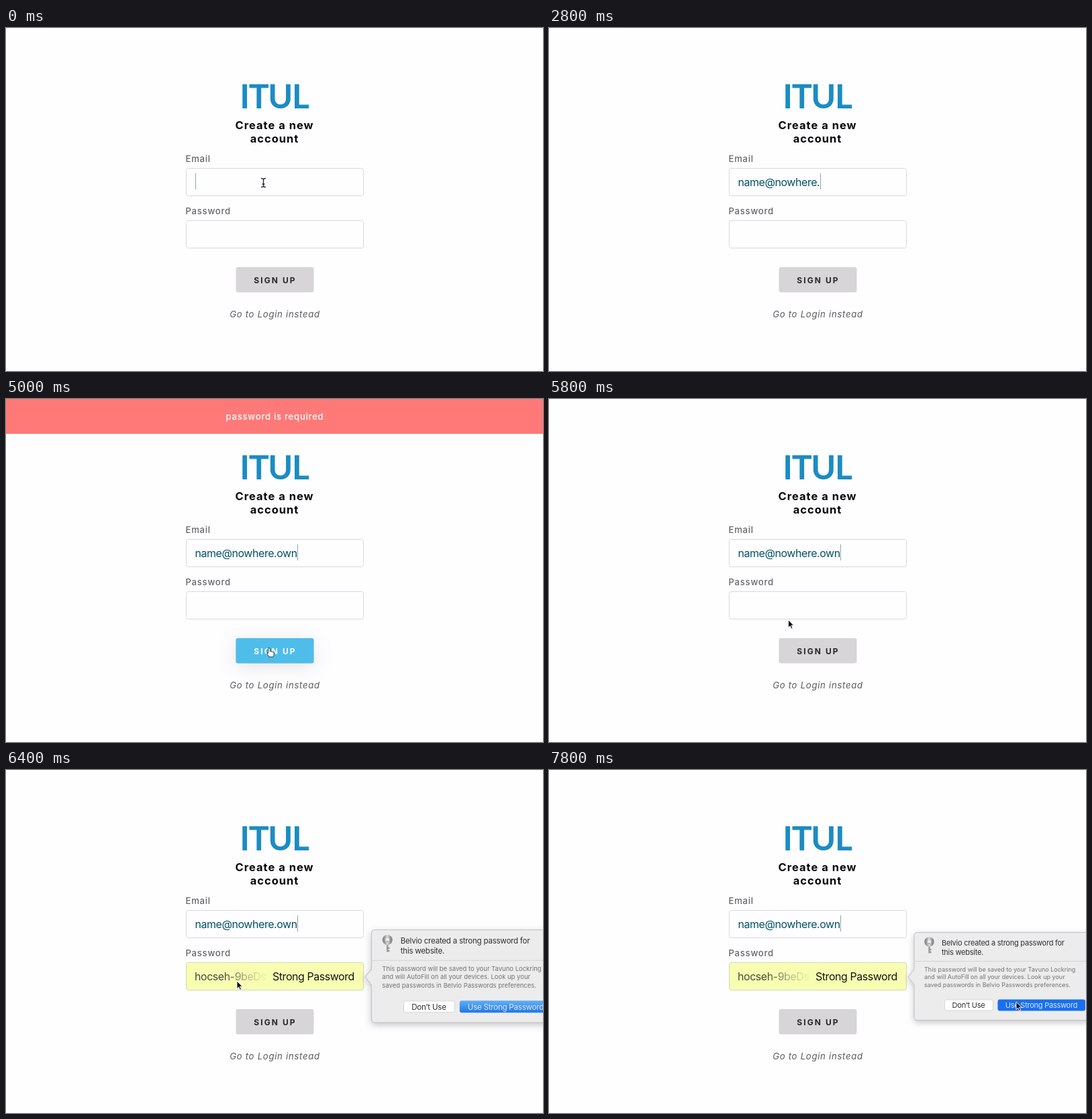
Animation, 800 px wide and 512 px high, one loop 8000 ms. Source, as an HTML page:

```html
<!DOCTYPE html>
<html lang="en">
<head>
<meta charset="utf-8">
<title>Create a new account</title>
<style>
html, body { margin: 0; width: 100%; height: 100%; overflow: hidden; background: #fefdff; }
svg { display: block; width: 100vw; height: 100vh; }
text { font-family: Inter, "Open Sans", sans-serif; }
.mid { text-anchor: middle; }
.brand { font: 700 50px Lato, sans-serif; letter-spacing: -1.4px; fill: #1b8cc3; }
.heading { font-size: 16.5px; font-weight: 700; letter-spacing: 1px; fill: #080808; }
.label { font-size: 13.2px; font-weight: 450; letter-spacing: .7px; fill: #666; }
.link { font-style: italic; fill: #5c5c5c; }
.field { fill: #fefdff; stroke: #dadada; }
.value { font-size: 16px; letter-spacing: -.45px; fill: #005064; }
.action { font-size: 12px; font-weight: 700; letter-spacing: 2.1px; fill: #262626; }
.note { font-size: 11px; letter-spacing: -.24px; fill: #303030; }
.small { font-size: 9px; fill: #737373; }
#hover { filter: drop-shadow(0 5px 14px rgba(0, 0, 0, .1)); }
#popover { filter: drop-shadow(0 3px 5px rgba(0, 0, 0, .22)); }
</style>
</head>
<body>
<svg viewBox="0 0 800 512">
  <defs>
    <linearGradient id="fade" gradientUnits="userSpaceOnUse" x1="325" x2="393" y1="0" y2="0">
      <stop stop-color="#454a3c"/>
      <stop offset="1" stop-color="#8d8a70" stop-opacity="0"/>
    </linearGradient>
    <linearGradient id="blue" x2="0" y2="1">
      <stop stop-color="#62aef6"/>
      <stop offset="1" stop-color="#2178e6"/>
    </linearGradient>
    <linearGradient id="metal">
      <stop stop-color="#8d8d8d"/>
      <stop offset=".5" stop-color="#d8d8d8"/>
      <stop offset="1" stop-color="#8a8a8a"/>
    </linearGradient>
    <path id="beamShape" d="M-3 -6.5Q0 -6.5 0 -4.5Q0 -6.5 3 -6.5M0 -4.5V4.500M-3 6.5Q0 6.5 0 4.500Q0 6.5 3 6.5M-1.500 2H1.500"/>
  </defs>

  <text class="brand mid" x="399.5" y="120">ITUL</text>
  <text class="heading mid" x="400" y="151">Create a new</text>
  <text class="heading mid" x="400" y="171">account</text>
  <text class="label" x="267.5" y="200">Email</text>
  <text class="label" x="267.5" y="278">Password</text>

  <rect class="field" x="268.5" y="209.5" width="264" height="41" rx="3"/>
  <text class="value" id="email" x="281.5" y="236"></text>
  <rect id="caret" y="217" width="1" height="24" fill="#8fa3aa"/>

  <rect class="field" x="268.5" y="287.5" width="264" height="41" rx="3"/>
  <g id="autofill">
    <rect x="268.5" y="287.5" width="264" height="41" rx="3" fill="#f7feb2" stroke="#d5d8b4"/>
    <text class="value" x="281" y="314" style="fill:url(#fade)">hocseh-9beDs</text>
    <text class="value" x="397" y="314" style="fill:#151515">Strong Password</text>
  </g>

  <rect x="342.5" y="357" width="116" height="37.5" rx="3" fill="#d7d5d7"/>
  <text class="action mid" x="401" y="381.3">SIGN UP</text>
  <g id="hover">
    <rect x="342.5" y="357" width="116" height="37.5" rx="3" fill="#4fbdea"/>
    <text class="action mid" x="401" y="381.3" style="fill:#fff">SIGN UP</text>
  </g>
  <text class="label link mid" x="400.5" y="432.4">Go to Login instead</text>

  <g id="banner">
    <rect width="800" height="52" fill="#ff7979"/>
    <text class="label mid" x="400.5" y="31" style="fill:#fff">password is required</text>
  </g>

  <g id="popover">
    <path d="M549 242.5H815V373.5H549Q544 373.5 544 368.5V320L535 309L544 298V247.5Q544 242.5 549 242.5Z" fill="#ececec" stroke="#c2c2c2"/>
    <path d="M544.5 285.5H800" stroke="#d2d2d2"/>
    <path d="M566.5 258V273.5M566.5 268H569.5M566.5 272H569.5" stroke="#9a9a9a" stroke-width="2.4"/>
    <circle cx="566.5" cy="256.5" r="5" fill="none" stroke="url(#metal)" stroke-width="4.5"/>
    <text class="note" x="585" y="261.5">Belvio created a strong password for</text>
    <text class="note" x="585" y="275.5">this website.</text>
    <text class="small" x="559" y="300.5">This password will be saved to your Tavuno Lockring</text>
    <text class="small" x="559" y="312.3">and will AutoFill on all your devices. Look up your</text>
    <text class="small" x="559" y="324">saved passwords in Belvio Passwords preferences.</text>
    <rect x="589.5" y="343" width="72" height="16" rx="3" fill="#fff" stroke="#d0d0d0" stroke-width=".8"/>
    <text class="note mid" x="625" y="355">Don’t Use</text>
    <rect id="accept" x="668.5" y="342.5" width="130.5" height="17" rx="3"/>
    <text class="note mid" x="733.5" y="355" style="fill:#dbe8fc">Use Strong Password</text>
  </g>

  <g id="pointer">
    <g id="beam" fill="none" stroke-linecap="round">
      <use href="#beamShape" stroke="#fff" stroke-width="2.6"/>
      <use href="#beamShape" stroke="#222" stroke-width="1.3"/>
    </g>
    <path id="hand" d="M-1.5 1Q-1.5 -.5 0 -.5T1.3 1V5Q2.5 4 3.6 5.3Q5 4.6 5.8 6Q7.2 5.7 7.2 7.5V9.5Q7 11.5 6 13H0Q-1.5 10.5 -3.2 8.3Q-3.5 6.6 -1.5 7.7Z" fill="#fff" stroke="#333"/>
    <path id="arrow" d="M0 0V11.5L2.7 9L4.6 13.3L6.6 12.4L4.7 8.2H8.2Z" fill="#111" stroke="#fff" stroke-width=".9"/>
  </g>
</svg>
<script>
const LOOP = 8000, STEP = 200;
const ADDRESS = "name@nowhere.own";
// time, x, y of the pointer's hot spot
const PATH = [
  [0, 383.5, 231], [3400, 383.5, 231], [4200, 392, 367], [4600, 392, 367],
  [4800, 392, 372], [5400, 392, 372], [6000, 344, 315], [6600, 344, 315],
  [7600, 696, 346], [LOOP, 696, 346]
];
const $ = id => document.getElementById(id);
const clamp = v => Math.min(1, Math.max(0, v));
const ease = v => v * v * (3 - 2 * v);
const show = (id, on) => { $(id).style.display = on ? "" : "none"; };

function pointerAt(t) {
  const i = PATH.findIndex(p => p[0] > t);
  const [t0, x0, y0] = PATH[i - 1], [t1, x1, y1] = PATH[i];
  const k = ease((t - t0) / (t1 - t0));
  return [x0 + (x1 - x0) * k, y0 + (y1 - y0) * k];
}

function pointerKind(t, y) {
  if (t >= 6400) return "arrow";
  if (y > 356) return "hand";
  return (y > 209 && y < 251) || (y > 287 && y < 329) ? "beam" : "arrow";
}

function render(t) {
  const email = $("email");
  email.textContent = ADDRESS.slice(0, Math.max(0, t / STEP - 1));
  const typed = email.textContent ? email.getComputedTextLength() : 0;
  $("caret").setAttribute("x", Math.round(282 + typed));

  const [x, y] = pointerAt(t), kind = pointerKind(t, y);
  $("pointer").setAttribute("transform", `translate(${x} ${y})`);
  show("pointer", t < 400 || t >= 3400);
  for (const id of ["beam", "hand", "arrow"]) show(id, id === kind);

  $("hover").style.opacity = clamp((t - 4180) / 300) - clamp((t - 5500) / 300);
  show("banner", t >= 5000 && t < 5800);
  show("autofill", t >= 6000);
  show("popover", t >= 6400);
  const scale = t < 6600 ? 1.055 : 1;
  $("popover").setAttribute("transform", `translate(535 309) scale(${scale}) translate(-535 -309)`);
  $("accept").setAttribute("fill", t < 7600 ? "url(#blue)" : "#1870ee");
}

const start = performance.now();
function tick(now) {
  const t = Math.max(0, now - start) % LOOP;
  render(Math.floor(t / STEP) * STEP);
  requestAnimationFrame(tick);
}
render(0);
requestAnimationFrame(tick);
</script>
</body>
</html>
```
